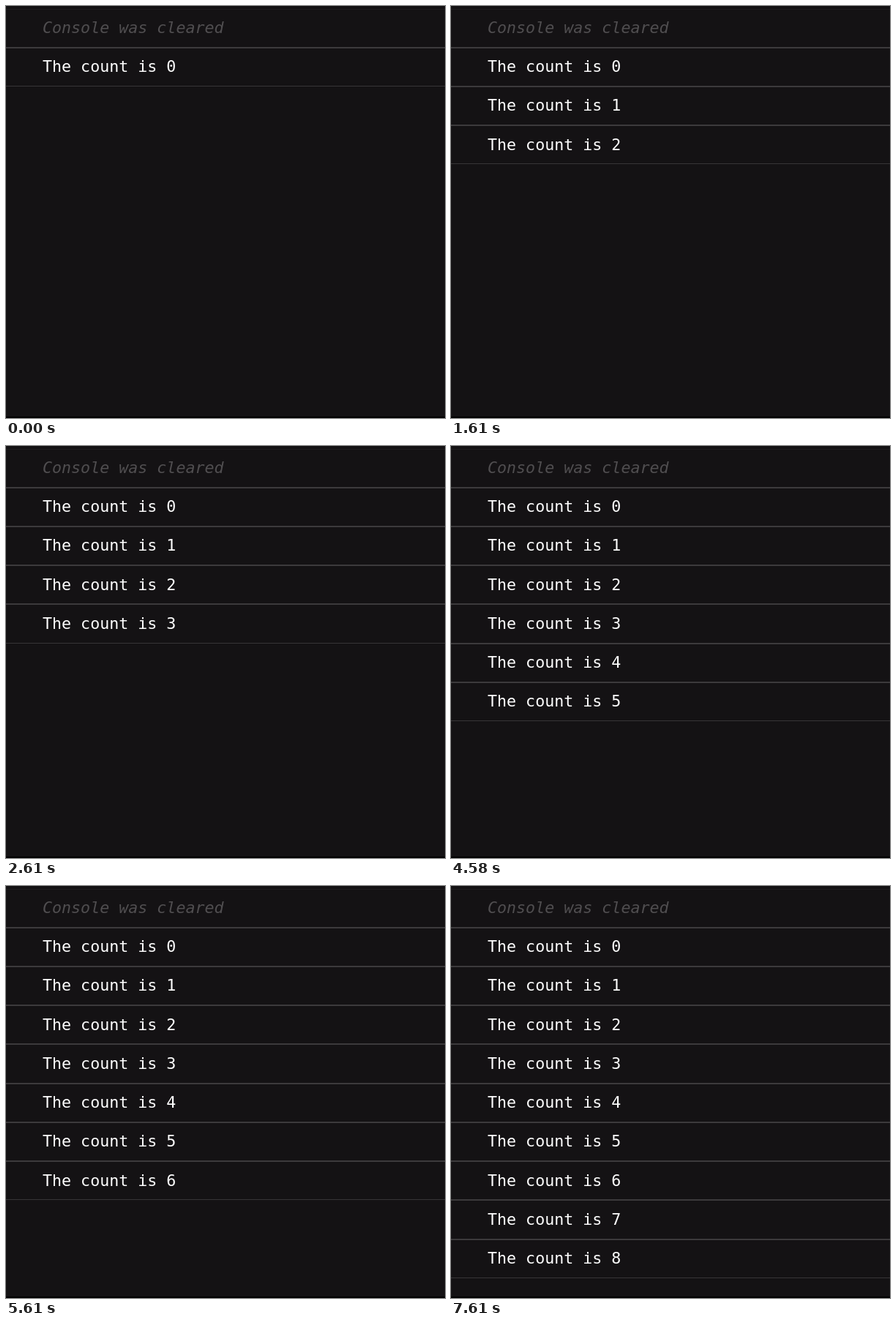
Animation, 600 px wide and 563 px high, one loop 8450 ms. Source, as an HTML page with a canvas:

```html
<!DOCTYPE html>
<html lang="en">
<head>
<meta charset="utf-8">
<title>Console counter</title>
<style>
  html, body { margin: 0; width: 100%; height: 100%; overflow: hidden; background: #141214; }
  canvas { display: block; }
</style>
</head>
<body>
<canvas id="stage" width="600" height="563"></canvas>
<script>
const ctx = document.getElementById('stage').getContext('2d');
const LOOP = 8450;
const STEPS = [0, 610, 1610, 2610, 3580, 4580, 5610, 6610, 7610];
const PITCH = 53.24;
const FONT = '21.65px "DejaVu Sans Mono", monospace';

function rule(y, height, color) {
  ctx.fillStyle = color;
  ctx.fillRect(0, y, 600, height);
}

function write(text, row, color, style = '') {
  ctx.font = style + FONT;
  ctx.fillStyle = color;
  ctx.fillText(text, 50, 37 + row * PITCH);
}

function draw(time) {
  const count = STEPS.filter(step => step <= time).length;
  rule(0, 563, '#141214');
  rule(4, 1, '#201e20');
  write('Console was cleared', 0, '#504e50', 'italic ');
  for (let row = 1; row <= count; row++) {
    rule(Math.floor(2.9 + row * PITCH), 2, '#3c3a3c');
    write(`The count is ${row - 1}`, row, '#fff');
  }
  // The newest entry has only its own thin bottom border.
  rule(Math.floor(2.9 + (count + 1) * PITCH), 1, '#373537');
  rule(561, 2, '#000');
}

const start = performance.now();
function tick() {
  draw((performance.now() - start) % LOOP);
  requestAnimationFrame(tick);
}
tick();
</script>
</body>
</html>
```
